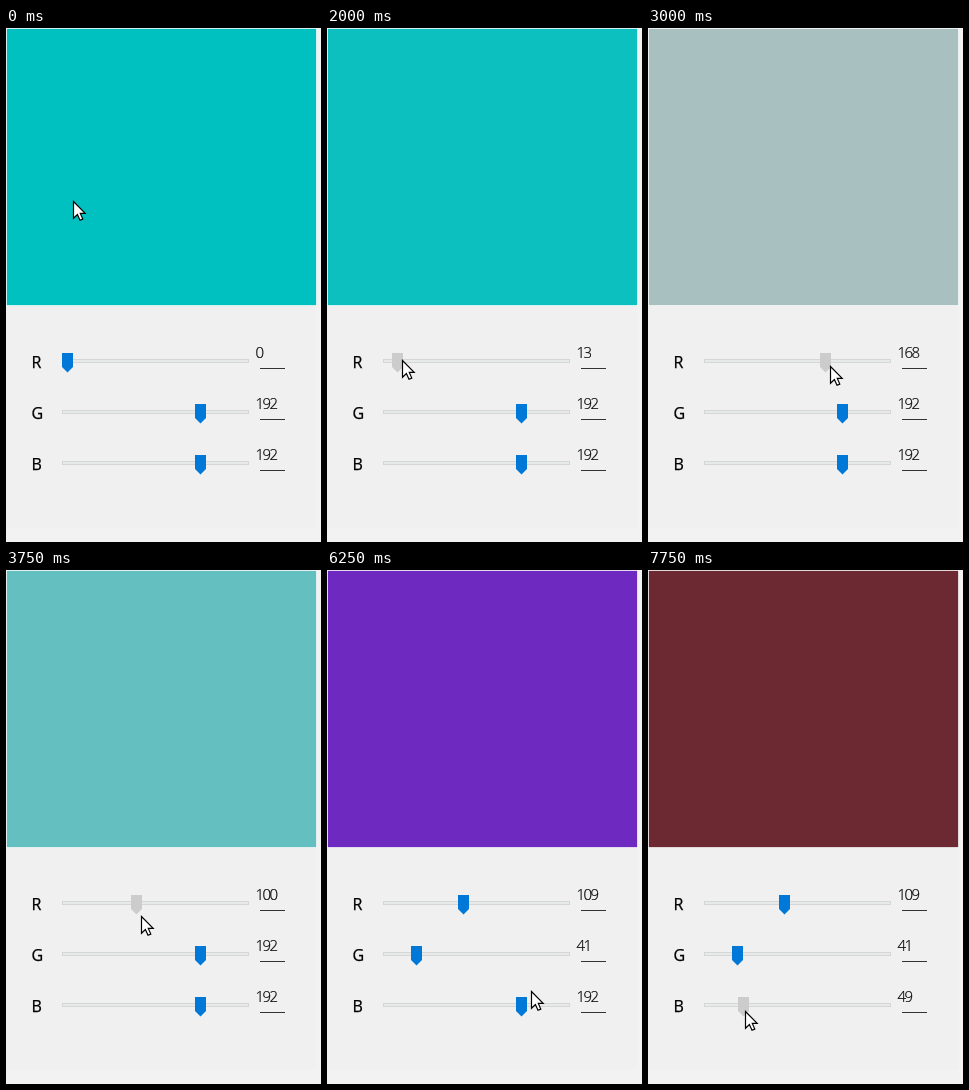
Recreate the animation shown at these times as an HTML page. Size 315 by 514 pixels, loop 8 s.

```html
<!DOCTYPE html>
<html lang="en">
<head>
<meta charset="utf-8">
<title>RGB sliders</title>
<style>
html, body { margin: 0; width: 100%; height: 100%; overflow: hidden; background: #f2f2f2; }
svg { display: block; }
.track { fill: #e7eaea; stroke: #d6d6d6; }
.label { font: 16px "Open Sans", sans-serif; stroke: #000; stroke-width: .25px; }
.value { font: 300 15px "Open Sans", sans-serif; letter-spacing: -1.5px; stroke: #000; stroke-width: .2px; }
</style>
</head>
<body>
<svg width="315" height="514" viewBox="0 0 315 514">
  <rect width="310" height="500" fill="#f0f0f0"/>
  <rect x=".5" y=".5" width="310" height="277" fill="none" stroke="#f8f8f8"/>
  <rect id="swatch" x=".85" y=".85" width="309.3" height="276.3"/>
  <g id="rows"></g>
  <path id="cursor" d="M.5 .5V17.3L4.4 13.6L7 19.3L9.8 18.1L7.3 12.4H12.2Z" fill="#fff" stroke="#000" stroke-width="1.2"/>
</svg>
<script>
const STEP = 250, STEPS = 32, PITCH = 51;
const BLUE = '#0078d7', HOVER = '#171717', PRESSED = '#cccccc';
const $ = id => document.getElementById(id);

// Key points are [step, values...], eased in between; a slider is held from its first to its last key
const pointer = [
  [0, 67, 173], [2, 31, 80], [7, 66, 332], [12, 182, 338], [15, 135, 346], [16, 141, 346],
  [18, 190, 392], [21.5, 84, 401], [25, 204, 421], [26, 196, 440], [31, 97, 441]
];
const sliders = [
  { name: 'R', keys: [[7, 0], [12, 168], [15, 100], [16, 109]] },
  { name: 'G', keys: [[18, 192], [21.5, 41]] },
  { name: 'B', keys: [[26, 192], [31, 49]] }
];

const ease = p => p < 0.5 ? 2 * p * p : 1 - 2 * (1 - p) ** 2;

function at(keys, n) {
  const next = keys.findIndex(k => k[0] > n);
  if (next === 0) return keys[0].slice(1);
  if (next < 0) return keys[keys.length - 1].slice(1);
  const [from, ...a] = keys[next - 1], [to, ...b] = keys[next];
  const p = ease((n - from) / (to - from));
  return a.map((v, i) => Math.round(v + (b[i] - v) * p));
}

function add(parent, tag, attrs, text = '') {
  const el = document.createElementNS('http://www.w3.org/2000/svg', tag);
  for (const key in attrs) el.setAttribute(key, attrs[key]);
  el.textContent = text;
  return parent.appendChild(el);
}

sliders.forEach((s, i) => {
  const row = add($('rows'), 'g', { transform: `translate(0 ${i * PITCH})` });
  add(row, 'text', { class: 'label', x: 25.5, y: 340 }, s.name);
  add(row, 'rect', { class: 'track', x: 56.5, y: 331.5, width: 186, height: 3 });
  add(row, 'path', { d: 'M254 340.5H279', stroke: '#333' });
  s.thumb = add(row, 'path', { d: 'M0 325H11V339L5.5 344.5L0 339Z' });
  s.value = add(row, 'text', { class: 'value', x: 249.5, y: 330 });
});

function draw(n) {
  const [px, py] = at(pointer, n);
  const rgb = sliders.map(({ keys, thumb, value }, i) => {
    const [v] = at(keys, n);
    const x = Math.round(56 + v * 0.691), y = 325 + i * PITCH;
    const held = n >= keys[0][0] && n <= keys[keys.length - 1][0];
    const over = px >= x && px < x + 11 && py >= y && py < y + 19;
    thumb.setAttribute('transform', `translate(${x} 0)`);
    thumb.setAttribute('fill', held ? PRESSED : over ? HOVER : BLUE);
    value.textContent = v;
    return v;
  });
  $('swatch').setAttribute('fill', `rgb(${rgb})`);
  $('cursor').setAttribute('transform', `translate(${px} ${py})`);
}

const start = performance.now();
let shown = 0;
function tick() {
  const n = Math.floor((performance.now() - start) / STEP) % STEPS;
  if (n !== shown) draw(shown = n);
  requestAnimationFrame(tick);
}
draw(0);
tick();
</script>
</body>
</html>
```
